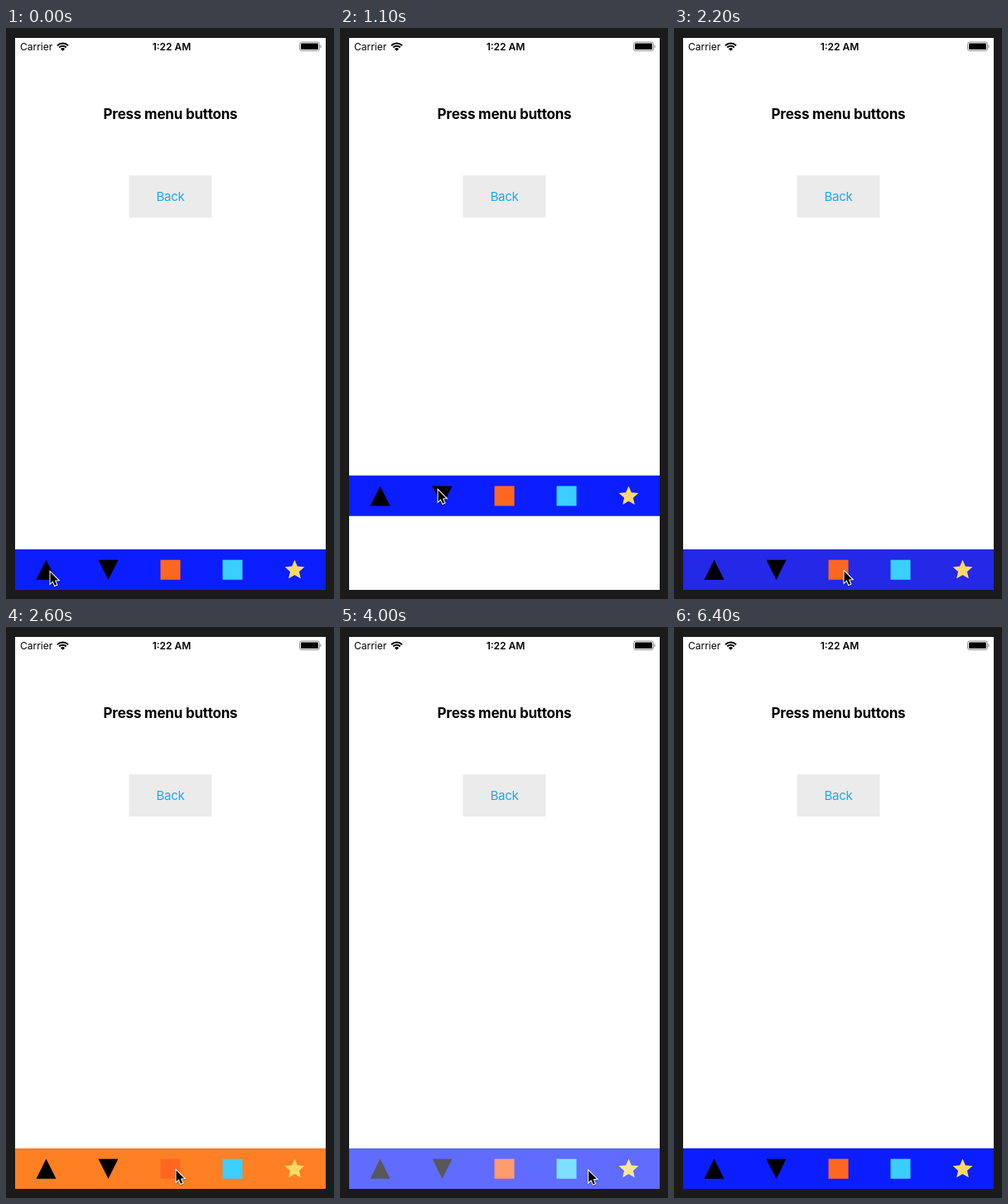
These frames come from a looping animation (396 px wide and 690 px high, 6500 ms). An HTML page with a canvas:

```html
<!DOCTYPE html>
<html lang="en">
<head>
<meta charset="utf-8">
<title>Menu buttons</title>
<style>
html, body { margin: 0; width: 100%; height: 100%; overflow: hidden; background: #1b1b1b; }
canvas { display: block; width: 396px; height: 690px; }
</style>
</head>
<body>
<canvas id="stage" width="396" height="690"></canvas>
<script>
const ctx = document.getElementById('stage').getContext('2d');
const LOOP = 6500, STEP = 100;
const SCREEN = { x: 11, y: 12, w: 375, h: 667 };
const BAR = { y: 630, h: 49 };
const BLUE = [10, 30, 255], ORANGE = [255, 127, 35];
const FONT = 'Inter, Roboto, sans-serif';

// Pointer stops: time, x, y
const STOPS = [
  [0, 53, 657], [100, 53, 657], [500, 111, 574], [800, 118, 558],
  [1100, 118, 558], [1500, 148, 607], [2000, 205, 656], [2700, 205, 656],
  [3100, 277, 657], [3800, 277, 657], [4400, 345, 656]
];
const POINTER_END = 5300;

const clamp = v => Math.min(1, Math.max(0, v));
const lerp = (a, b, k) => a + (b - a) * k;

function easeIn(x) {
  let lo = 0, hi = 1;
  for (let i = 0; i < 24; i++) {
    const u = (lo + hi) / 2, v = 1 - u;
    if (1.26 * u * v * v + 3 * u * u * v + u * u * u < x) lo = u; else hi = u;
  }
  return lo * lo * (3 - 2 * lo);
}

const easeInOut = x => x < 0.5 ? easeIn(2 * x) / 2 : 1 - easeIn(2 - 2 * x) / 2;

// Half-second tween beginning at the given time
function tween(t, start) {
  const k = clamp((t - start) / 500);
  return k === 0 || k === 1 ? k : easeInOut(k);
}

const thereAndBack = (t, start) => tween(t, start) - tween(t, start + 500);

// Lightly damped spring from 0.7 to 1
function springScale(t) {
  const s = (t - 4600) / 1000;
  if (s < 0) return 1;
  const decay = 2, w = 15.04;
  return 1 - 0.3 * Math.exp(-decay * s) * (Math.cos(w * s) + decay / w * Math.sin(w * s));
}

function pointerAt(t) {
  const i = STOPS.findIndex(p => p[0] > t);
  if (i < 0) return STOPS[STOPS.length - 1].slice(1);
  const [t0, x0, y0] = STOPS[i - 1], [t1, x1, y1] = STOPS[i];
  const k = (t - t0) / (t1 - t0);
  return [lerp(x0, x1, k), lerp(y0, y1, k)];
}

function rect(color, x, y, w, h) {
  ctx.fillStyle = color;
  ctx.fillRect(x, y, w, h);
}

function trace(points) {
  ctx.beginPath();
  points.forEach(([x, y]) => ctx.lineTo(x, y));
  ctx.closePath();
}

function poly(color, points) {
  trace(points);
  ctx.fillStyle = color;
  ctx.fill();
}

function label(text, x, y, font, color = '#000', align = 'center', spacing = 0) {
  ctx.font = `${font} ${FONT}`;
  ctx.letterSpacing = spacing + 'px';
  ctx.textAlign = align;
  ctx.fillStyle = color;
  ctx.fillText(text, x, y);
}

function drawWifi() {
  const x = 68.5, y = 27.8, a = Math.PI * 0.25;
  ctx.strokeStyle = '#000';
  ctx.lineWidth = 2;
  for (const r of [6, 9.2]) {
    ctx.beginPath();
    ctx.arc(x, y, r, -Math.PI / 2 - a, -Math.PI / 2 + a);
    ctx.stroke();
  }
  ctx.beginPath();
  ctx.moveTo(x, y);
  ctx.arc(x, y, 3.7, -Math.PI / 2 - a, -Math.PI / 2 + a);
  ctx.fillStyle = '#000';
  ctx.fill();
}

function drawBattery() {
  ctx.strokeStyle = '#8e8e8e';
  ctx.lineWidth = 1;
  ctx.beginPath();
  ctx.roundRect(354.5, 17, 24, 10.5, 2.5);
  ctx.stroke();
  ctx.fillStyle = '#000';
  ctx.beginPath();
  ctx.roundRect(356, 18.5, 21, 7.5, 1);
  ctx.fill();
  rect('#8e8e8e', 379.5, 20.5, 1, 3.5);
}

function drawScreen() {
  rect('#1b1b1b', 0, 0, 396, 690);
  rect('#fff', SCREEN.x, SCREEN.y, SCREEN.w, SCREEN.h);
  label('Carrier', 17, 26.5, '400 12px', '#000', 'left');
  label('1:22 AM', 200, 26.5, '600 12px');
  drawWifi();
  drawBattery();
  label('Press menu buttons', 198.5, 109.5, '700 17px', '#000', 'center', -0.2);
  rect('#ebebeb', 148.5, 178, 100, 51);
  label('Back', 198.5, 209.3, '400 15px', '#1ca8f3', 'center', -0.2);
}

const star = Array.from({ length: 10 }, (_, i) => {
  const r = i % 2 ? 5.7 : 12.5, a = i * Math.PI / 5;
  return [r * Math.sin(a), 0.5 - r * Math.cos(a)];
});
const square = [[-12, -12], [12, -12], [12, 12], [-12, 12]];
const ICONS = [
  ['#000', [[0, -12], [12, 12], [-12, 12]]],
  ['#000', [[-12, -12], [12, -12], [0, 12]]],
  ['#ff6720', square],
  ['#3acfff', square],
  ['#ffd966', star]
];

function drawBar(t) {
  const y = BAR.y - 100 * (tween(t, 0) - tween(t, 1000));
  const mix = thereAndBack(t, 2100);
  const color = BLUE.map((c, i) => Math.round(lerp(c, ORANGE[i], mix)));
  const scale = springScale(t);
  rect(`rgb(${color})`, SCREEN.x, y, SCREEN.w, BAR.h);
  ICONS.forEach(([fill, points], i) => {
    ctx.save();
    ctx.translate(48.5 + 75 * i, y + 24.7);
    ctx.scale(scale, scale);
    poly(fill, points);
    ctx.restore();
  });
  // Fading the whole bar equals covering it with the white page
  const fade = thereAndBack(t, 3200);
  if (fade > 0) rect(`rgba(255,255,255,${fade})`, SCREEN.x, y, SCREEN.w, BAR.h);
}

function drawPointer(t) {
  if (t >= POINTER_END) return;
  ctx.save();
  ctx.translate(...pointerAt(t));
  ctx.shadowColor = 'rgba(0,0,0,0.35)';
  ctx.shadowBlur = 2;
  ctx.shadowOffsetY = 1;
  trace([[0.5, 0.5], [0.5, 14.2], [3.6, 11.3], [6, 16.8], [8.2, 15.8], [5.9, 10.5], [10.2, 10.2]]);
  ctx.strokeStyle = '#fff';
  ctx.lineWidth = 2;
  ctx.lineJoin = 'miter';
  ctx.stroke();
  ctx.shadowColor = 'transparent';
  ctx.fillStyle = '#000';
  ctx.fill();
  ctx.restore();
}

function draw(now) {
  // The picture advances ten times a second
  const t = Math.floor(((now + 5) % LOOP) / STEP) * STEP;
  drawScreen();
  drawBar(t);
  drawPointer(t);
}

function tick(now) {
  draw(now);
  requestAnimationFrame(tick);
}

draw(0);
requestAnimationFrame(tick);
</script>
</body>
</html>
```
